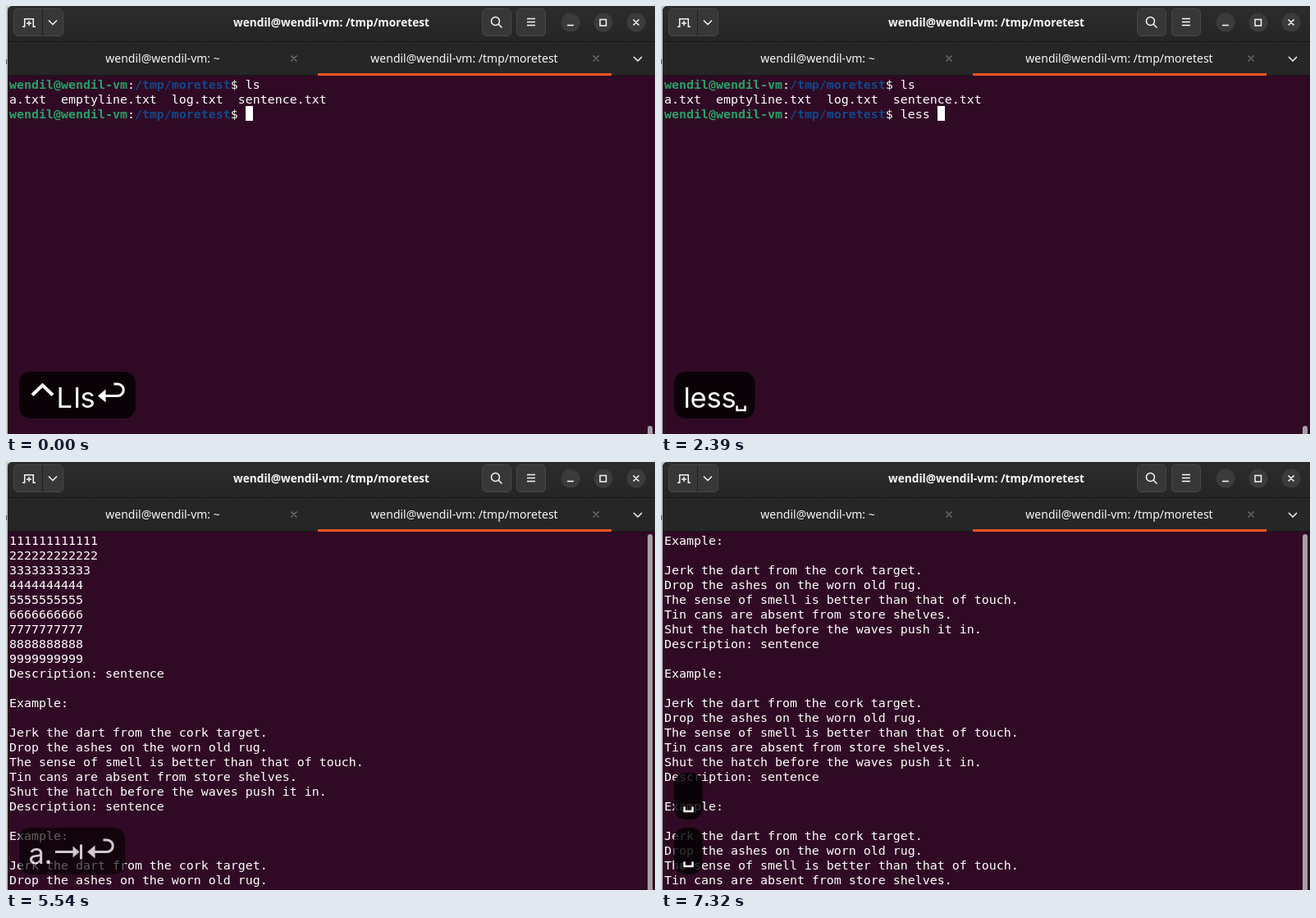
An HTML page for the animation above (8000 ms loop, 791 by 522 pixels).

```html
<!DOCTYPE html>
<html lang="en">
<head>
<meta charset="utf-8">
<title>Terminal</title>
<style>
  html, body { margin: 0; width: 100%; height: 100%; overflow: hidden; background: #300a24; }
  svg { display: block; }
  text { white-space: pre; }
  .ui { font: 14px "Noto Sans", "Open Sans", sans-serif; fill: #f7f7f7; text-anchor: middle; }
  .title { font-weight: 700; font-size: 13.7px; }
  .mono { font: 14.95px "DejaVu Sans Mono", "Liberation Mono", monospace; fill: #fff; }
  .key { font: 34.5px Inter, "Liberation Sans", sans-serif; fill: #fff; }
  .line { fill: none; stroke: #f7f7f7; stroke-width: 1.5; }
  .btn { fill: #373737; stroke: #484848; }
  .b { font-weight: 700; }
</style>
</head>
<body>
<svg width="791" height="522" viewBox="0 0 791 522">
  <defs>
    <linearGradient id="bar" x2="0" y2="1">
      <stop offset="0" stop-color="#2c2c2c"/><stop offset="1" stop-color="#252525"/>
    </linearGradient>
  </defs>
  <rect width="791" height="522" fill="#c3c8c4"/>
  <path d="M0 65h1v6h-1z" fill="#444"/>
  <path d="M2 522V7Q2 0 9 0H791V522z" fill="#300a24"/>
  <path d="M2 85V7Q2 0 9 0H791V85z" fill="#262626"/>
  <path d="M2 43V7Q2 0 9 0H791V43z" fill="url(#bar)"/>
  <path d="M2 43.5H791M2 84.5H791" stroke="#171717"/>
  <rect x="380" y="82" width="358" height="3" fill="#e95420"/>

  <rect class="btn" x="9.500" y="3.500" width="60" height="33" rx="5"/>
  <path d="M44.500 4V36" stroke="#1e1e1e"/>
  <path class="line" d="M20 25.300H22.700V15.700H33.300V25.300H36M28 18v6M25 21h6M52 17.500l5 5 5-5"/>
  <rect class="btn" x="580.500" y="3.500" width="35" height="33" rx="5"/>
  <circle class="line" cx="596.500" cy="18.500" r="5"/>
  <path class="line" d="M600 22l4.500 4.500"/>
  <rect class="btn" x="622.500" y="3.500" width="35" height="33" rx="5"/>
  <path class="line" d="M635 15.500h10M635 19.500h10M635 23.500h10"/>
  <g fill="#3b3b3b">
    <circle cx="688" cy="20" r="11.500"/><circle cx="728" cy="20" r="11.500"/><circle cx="768" cy="20" r="11.500"/>
  </g>
  <path class="line" d="M684 23.500h8M724 16.500h7.500v7.500h-7.500zM764.500 16.500l7 7m0-7l-7 7"/>
  <path class="line" d="M347.500 60.500l7 7m0-7l-7 7M715.500 60.500l7 7m0-7l-7 7" style="stroke:#777;stroke-width:1.2"/>
  <path class="line" d="M765 62l5 5 5-5"/>

  <text class="ui title" x="396.500" y="25">wendil@wendil-vm: /tmp/moretest</text>
  <text class="ui" x="191" y="69">wendil@wendil-vm: ~</text>
  <text class="ui" x="558.500" y="69">wendil@wendil-vm: /tmp/moretest</text>

  <g id="screen" class="mono"></g>
  <g id="keys" class="key"></g>
</svg>
<script>
const LOOP = 8000, COL = 9, ROW = 18, LEFT = 4, BASE = 101, ROWS = 25;
const screen = document.getElementById('screen');
const keys = document.getElementById('keys');

const PROMPT = '<tspan class="b" fill="#26a269">wendil@wendil-vm</tspan>:' +
  '<tspan class="b" fill="#12488b">/tmp/moretest</tspan>$ ';
const PROMPT_COLS = 32;

const BLOCK = [
  'Description: sentence', '', 'Example:', '',
  'Jerk the dart from the cork target.',
  'Drop the ashes on the worn old rug.',
  'The sense of smell is better than that of touch.',
  'Tin cans are absent from store shelves.',
  'Shut the hatch before the waves push it in.'
];
const DIGIT_LENGTHS = [12, 12, 11, 10, 10, 10, 10, 10, 10];

// Each step changes only the listed fields and holds until the next one.
const steps = [
  [0, { cmd: '', cursor: true, page: -1, low: '^Lls↩', lowFade: 1, high: '', highFade: 1 }],
  [150, { cursor: false }],
  [450, { cmd: 'l', cursor: true, low: 'le', high: '^Lls↩' }],
  [600, { cmd: 'le' }],
  [750, { cmd: 'les', low: 'les' }],
  [900, { cmd: 'less', low: 'less' }],
  [1200, { cmd: 'less ', low: 'less␣' }],
  [1500, { highFade: 0.75 }],
  [1650, { highFade: 0.1 }],
  [1800, { high: '', highFade: 1, cursor: false }],
  [2390, { cursor: true }],
  [2840, { cmd: 'less a', low: 'a', high: 'less␣' }],
  [2990, { low: 'a.' }],
  [3140, { cmd: 'less a.txt ', low: 'a.⇥', highFade: 0.93 }],
  [3290, { high: '', highFade: 1 }],
  [3590, { page: 0, low: 'a.⇥↩' }],
  [5540, { lowFade: 0.78 }],
  [5690, { lowFade: 0.1 }],
  [5830, { low: '', lowFade: 1 }],
  [6430, { low: '␣' }],
  [6580, { page: 25 }],
  [7320, { page: 29, high: '␣' }]
];
const states = [];
for (const [at, change] of steps) states.push({ ...states.at(-1), ...change, at });

const ADVANCE = { '^': 34, L: 21, l: 8, e: 20, s: 18, a: 19, '.': 10, '␣': 11.5, '⇥': 39, '↩': 38 };
const stroke = (d, w) => `<path d="${d}" fill="none" stroke="#fff" stroke-width="${w}"/>`;
const ICONS = {
  '^': stroke('M4.5 -15.500L17 -27.500L29.500 -15.500', 4),
  '␣': stroke('M1 -2.500V3H11V-2.500', 2.5),
  '⇥': stroke('M3.500 -14.500H28M35 -23.500V-5.500', 3) + '<path d="M25 -21.500L33 -14.500L25 -7.500z"/>',
  '↩': stroke('M9 -14.500H27.500A7.200 7.200 0 0 0 27.500 -29H23', 3) + '<path d="M13 -22.500L3.500 -14.500L13 -6.500z"/>'
};

const textRow = (row, s) => `<text x="${LEFT}" y="${BASE + row * ROW}">${s}</text>`;

function fileLine(i) {
  return i < 9 ? String(i + 1).repeat(DIGIT_LENGTHS[i]) : BLOCK[i % 9];
}

function scrollbar(top) {
  return `<rect x="782" y="${top}" width="6" height="460" rx="3" fill="#a89fa5"/>`;
}

function shellView(s) {
  const x = LEFT + (PROMPT_COLS + s.cmd.length) * COL;
  return textRow(0, PROMPT + 'ls') +
    textRow(1, 'a.txt  emptyline.txt  log.txt  sentence.txt') +
    textRow(2, PROMPT + s.cmd) +
    (s.cursor ? `<rect x="${x}" y="122" width="${COL}" height="${ROW}"/>` : '') +
    scrollbar(512);
}

function pagerView(top) {
  let out = scrollbar(88);
  for (let r = 0; r < ROWS; r++) out += textRow(r, fileLine(top + r));
  return out;
}

function keyBox(label, y, fade) {
  if (!label) return '';
  let x = 11.5, marks = '';
  for (const c of label) {
    marks += `<g transform="translate(${x} 44)">${ICONS[c] || `<text>${c}</text>`}</g>`;
    x += ADVANCE[c];
  }
  return `<g transform="translate(16 ${y})" opacity="${fade}">` +
    `<rect width="${x + 11.5}" height="57" rx="14" fill="#000" fill-opacity=".8"/>${marks}</g>`;
}

let shown;
function render(t) {
  const s = states.findLast(v => v.at <= t);
  if (s === shown) return;
  shown = s;
  screen.innerHTML = s.page < 0 ? shellView(s) : pagerView(s.page);
  keys.innerHTML = keyBox(s.high, 379, s.highFade) + keyBox(s.low, 446, s.lowFade);
}

function tick() {
  render(performance.now() % LOOP);
  requestAnimationFrame(tick);
}
tick();
</script>
</body>
</html>
```
